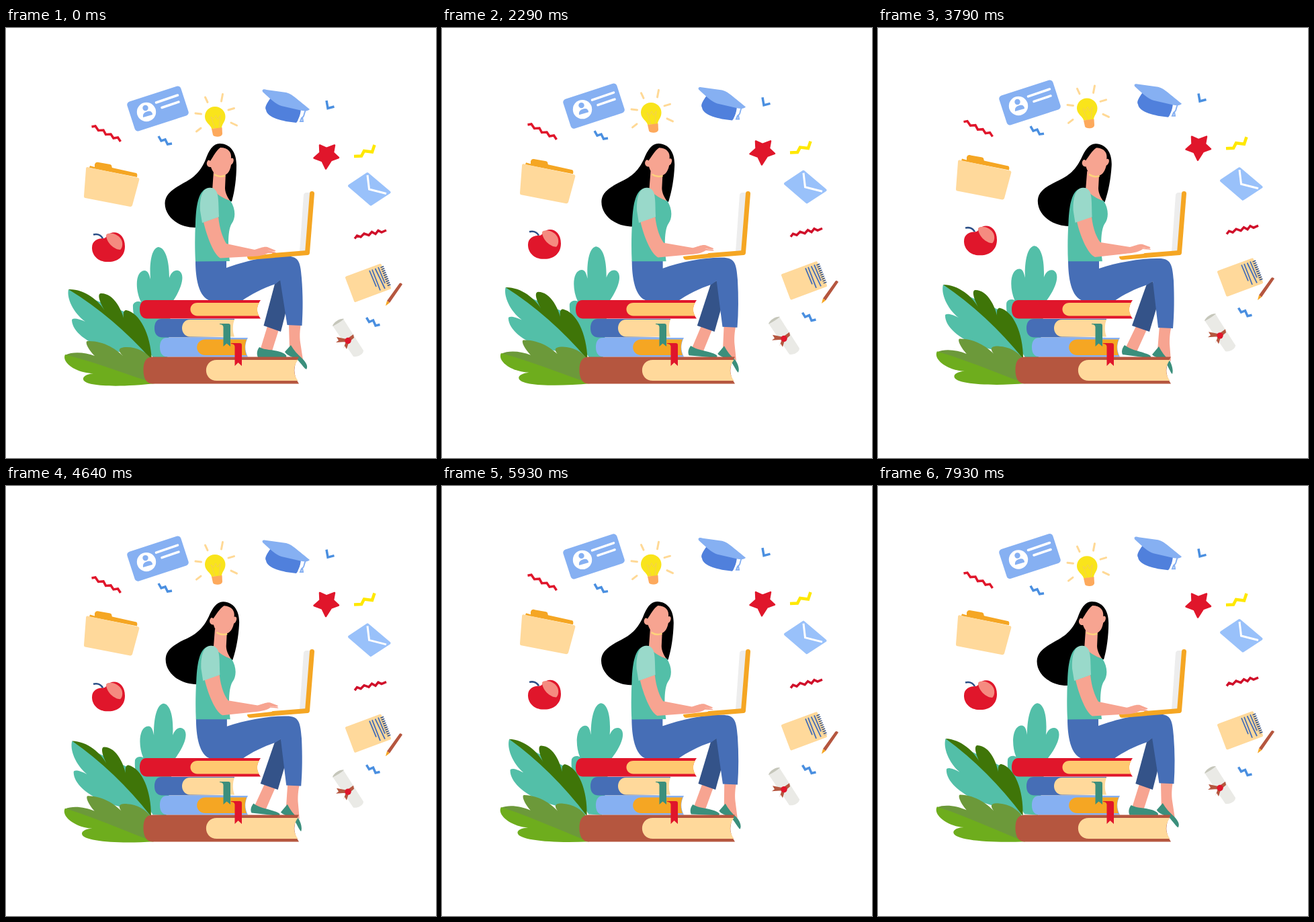
An HTML page for the animation above (8000 ms loop, 640 by 640 pixels).

```html
<!DOCTYPE html>
<html lang="en">
<head>
<meta charset="utf-8">
<title>Studying on a stack of books</title>
<style>
  html, body { margin: 0; width: 100%; height: 100%; overflow: hidden; background: #fff; }
  svg { display: block; width: 100%; height: 100%; }
  .line { fill: none; stroke-width: 3.5; }
  .teal { fill: #53bfa8; }
  .skin { fill: #f7a491; }
  .jeans { fill: #466eb6; }
  .shoe { fill: #3b8f7c; }
  .sky { fill: #86b0f2; }
  .cream { fill: #ffd99b; }
  .orange { fill: #f5a623; }
  .red { fill: #e0162b; }
  .brown { fill: #b5563f; }
  .blue { stroke: #4a8fe0; }
</style>
</head>
<body>
<svg viewBox="0 0 640 640">
  <!-- floating items: data-float = "rise height, time of the peak in ms" -->
  <g data-float="16 7000">
    <rect class="sky" x="-42" y="-23" width="84" height="46" rx="5" transform="translate(226 120) rotate(-18)"/>
    <circle cx="209" cy="125" r="14.2" fill="#fff"/>
    <circle class="sky" cx="207.5" cy="119" r="4.2"/>
    <path class="sky" d="M204 133C203 127 207 125 211 124C215 123 218 125 218 129Z"/>
    <path class="line" stroke="#fff" stroke-linecap="round" d="M223.500 111L255.500 100M232 118.500L257 110"/>
  </g>
  <g data-float="15.5 5300">
    <path fill="#f9e41b" d="M311 117C320 117 326.500 124 326.500 132C326.500 140 321 143 321 149L306 150C305 144 296 141 296 132C296 124 302 117 311 117Z"/>
    <path class="line" stroke="#f5d04f" style="stroke-width:1" d="M311 149L305 132L309 136L312 130L315 136L319 130L317 148"/>
    <path fill="#fda95c" d="M306 150L321.500 148L322 157C322 163 309 163 308 159Z"/>
    <path class="line" stroke="#ffd996" style="stroke-width:3" stroke-linecap="round" d="M282 127L290.500 128M296.500 103L300 110.500M322.500 98.500L320.500 109M331 122L339.500 119.500M335 141L343.500 145M283.500 154L290 149"/>
  </g>
  <g data-float="16 7500">
    <path fill="#5080dc" d="M394 104C389 111 384 118 387 122C389 134 412 139 432 141C436 137 438 129 439 121Z"/>
    <path class="line" stroke="#fff" d="M444 120L436 138"/>
    <path class="sky" d="M381.500 93C382 91 385 91 388 92L417 96C425 98 430 103 452 121C450 124 443 124 436 122L410 116C401 113 394 106 382 95Z"/>
    <path class="line" stroke="#86b0f2" style="stroke-width:2" d="M447 121C442 126 446 131 440 134L438 139L442 139L441 133"/>
  </g>
  <g data-float="16 6300">
    <path class="orange" d="M132 203C133 200 135 199 138 200L155 203C158 204 157 206 158 208L194 216Q196 217 195 222L124 208L125 205L132 207Z"/>
    <path class="cream" d="M121 207L197 223Q199 224 198 227L188 264Q187 266 185 266L118 253Q116 253 116 250L119 210Q119 207 121 207Z"/>
  </g>
  <g data-float="16 6600">
    <path class="red" d="M150 309C160 299 177 305 177 325C177 340 166 348 153 348C138 349 128 339 128 327C128 317 136 313 145 313C148 313 149 311 150 309Z"/>
    <path fill="#f58b80" d="M149 308C153 303 166 306 171 314C175 320 173 328 170 330C161 330 149 319 149 308Z"/>
    <path class="line" stroke="#2b4f87" style="stroke-width:2.500" d="M130 307.500C136 306 141 308 144 313"/>
  </g>
  <path data-float="16.5 5500" class="red" stroke="#e0162b" stroke-width="2.500" stroke-linejoin="round" d="M467 174.500L477 179L489 174.500L487 185.500L495 193L484 197L476 209.500L470.500 198L458.500 193.500L467.500 185.500Z"/>
  <g data-float="17 8000">
    <path fill="#99c1fa" stroke="#99c1fa" stroke-width="4" stroke-linejoin="round" d="M511 235L538 217L570.500 244.500L543 262.500Z"/>
    <path class="line" stroke="#fff" style="stroke-width:3" d="M538 219L540.500 240L566 246.500"/>
  </g>
  <g data-float="16 7300">
    <path class="cream" stroke="#ffd99b" stroke-width="4" stroke-linejoin="round" d="M507 371.500L557 353L571 387L520 406Z"/>
    <path class="line" stroke="#466eb6" style="stroke-width:1.800" d="M541 361L551 385M545 359.500L557 390.500M549.500 358L564 388M554 356L564 380"/>
    <path class="line" stroke="#2f4f88" style="stroke-width:5" stroke-dasharray="1.500 1.700" d="M559.500 355L571 385"/>
    <path class="brown" d="M585 381Q587 378 590 381.500L571 409L567 406Z"/>
    <path class="orange" d="M567 406L571 409L565 413.500Z"/>
  </g>
  <g data-float="16 7800">
    <path fill="#eaeae6" d="M486 443C488 437 498 432 502 433L532 480C532 486 523 490 517 489Z"/>
    <path fill="#c5c6ba" d="M486 444C488 437 498 432 503 433C499 437 493 440 486 444Z"/>
    <path class="brown" d="M507 463L517 456L518 461L510 468L507 478L504 473L502 477L506 467L491 468L495 465L492 460Z"/>
    <circle class="red" cx="509" cy="465.500" r="4.700"/>
  </g>
  <path data-float="17 8300" class="line" stroke="#e0162b" d="M127.500 147L133 146L137.500 152.500L145 152L148.500 158.500L156 158L160 164L166.500 163L170.500 169"/>
  <path data-float="16 4600" class="line blue" d="M227 161L231 168L237 166L240.500 173L247 172"/>
  <path data-float="16 6300" class="line blue" d="M477 108L479 119.500L488.500 117"/>
  <path data-float="16 5800" class="line" stroke="#ffe800" style="stroke-width:4.500" d="M518 191L529 190.500L533 183L545 184.500L548.500 174"/>
  <path data-float="16 8400" class="line" stroke="#d0102a" d="M519 313.500L522.500 309L528 311L533 306L540 308.500L544.500 303.500L550 306.500L554 301.500L559 304L566 301"/>
  <path data-float="16 4800" class="line blue" d="M536.500 431L540.500 437.500L546.500 435L550 443L556.500 441.500"/>

  <!-- plants: data-sway = "degrees, pivot x, pivot y, time of the peak" -->
  <path data-sway="4.4 270 465 7200" class="teal" d="M227 326C237 327 243 345 243 372C246 363 251 360 256 361C267 364 264 385 246 410L240 492H220C198 462 188 430 189 412C191 407 197 406 201 408C192 390 192 362 206 361C211 361 213 366 215 374C213 345 218 327 227 326Z"/>
  <g data-sway="4.800 255 475 7300">
    <path class="teal" d="M93 389C90 402 100 424 118 437C107 432 98 431 98 435C99 452 120 468 150 478L217 493L178 423Z"/>
    <path fill="#3f7508" d="M93 389C115 388 138 404 149 424C140 410 135 396 141 395C160 394 174 420 178 443C174 430 173 420 179 420C199 424 215 455 217 494Q160 430 93 389Z"/>
  </g>
  <g data-sway="3.900 218 480 7300">
    <path fill="#6c993a" d="M88 487C100 481 118 483 132 488C122 478 117 467 121 466C145 465 165 478 177 491C166 481 165 475 180 475C195 475 208 482 216 492L222 529C190 525 130 510 88 487Z"/>
    <path fill="#6ead1d" d="M88 486C82 498 105 514 130 514C120 515 114 519 115 523C117 534 170 535 222 529C180 516 135 498 88 486Z"/>
  </g>

  <!-- woman -->
  <g class="body"><g class="head">
    <path d="M318 172C333 172 343 184 343 204C343 225 340 245 336 258L315 262L300 297H281C257 297 236.500 281 236.500 261C236.500 248 248 240 262 232C282 222 290 212 297 196C302 182 308 172 318 172Z"/>
  </g></g>
  <path id="backShin" class="skin"/>
  <path id="backShoe" class="shoe"/>
  <path id="backLeg" fill="#345389"/>
  <path id="frontShin" class="skin"/>
  <path id="frontShoe" class="shoe"/>
  <path id="trousers" class="jeans"/>
  <g class="body">
    <path class="skin" d="M309 213L307 242C313 250 325 254 334 258C328 250 326 243 326 238L327 215Z"/>
    <g class="head">
      <path class="skin" d="M319 178C331 178 336 185 335 194C338 192 340 196 338 200C337 203 335 203 335 204C333 215 328 220 320 220C311 220 307 213 305 207C300 208 297 202 300 198C301 196 303 197 304 198C308 192 313 182 319 178Z"/>
      <path class="line" stroke="#ffd27c" style="stroke-width:2.500" d="M310 218Q318 223 326 219.500"/>
    </g>
    <path class="teal" d="M302 238C288 240 283 258 282 290C281 310 281 330 282 347.500L333 347C330 325 330 300 336 291C342 283 342 269 334 257C325 255 313 247 307 240Z"/>
  </g>
  <path fill="#ededed" d="M443 248Q444 245 447 245H453L446 332L437 333Z"/>
  <path class="line" stroke="#f5a623" style="stroke-width:7" stroke-linecap="round" stroke-linejoin="round" d="M455.500 246.500L448.500 334.500L398 338.500"/>
  <path class="orange" d="M359 340L400 335.500V342L364 345Q359 345 359 340Z"/>
  <path id="arm" class="skin"/>
  <g class="body">
    <path fill="#99d9ca" d="M301 238C291 240 288 256 289 272L292 290L317 281C316 265 317 250 313 243C310 238 306 237 301 238Z"/>
  </g>

  <!-- books -->
  <path class="red" d="M209 405H379C372 414 372 424 379 432.500H209C202 432 199 426 199 419C199 411 202 405 209 405Z"/>
  <path fill="#ffc870" d="M285 409H377C373 415 373 423 377 428.500H285C271 428 271 409 285 409Z"/>
  <path class="jeans" d="M232 433H340V434.500L275 436V459L340 460.500H232C224 460 221 454 221 447C221 439 224 433 232 433Z"/>
  <path class="cream" d="M274 434H340C337 442 337 452 340 459.500H274C258 459 258 434 274 434Z"/>
  <path class="sky" d="M240 461H360C355 470 355 480 360 489.500H240C232 489 229 483 229 475C229 467 232 461 240 461Z"/>
  <path class="orange" d="M297 463.500H358C355 472 355 480 358 487H297C280 487 280 463.500 297 463.500Z"/>
  <path class="brown" d="M218 489.500H436C427 503 427 516 436 529.500H218C208 529 204.500 520 204.500 509C204.500 497 208 490 218 489.500Z"/>
  <path class="cream" d="M314 494H434.500C427 504 427 515 434.500 525H314C292.500 525 292.500 494 314 494Z"/>
  <path class="shoe" d="M318 440H331Q334 440 334 443V474L328.500 469.500L323.500 474V445Q323 441 318 441Z"/>
  <path class="red" d="M335 469H348Q351 469 351 472V503L345.500 498L340.500 503V474Q340 470 335 470Z"/>
</svg>
<script>
  const LOOP = 8000, CYCLE = 15000, LEAN_PERIOD = 7500;

  // Each limb is a pair of poses, upright and leaning, with matching commands.
  const poses = {
    backShin: [
      "M389 444L406 449L395 484L378 480Z",
      "M384 444L400 449L385 482L368 477Z"],
    backShoe: [
      "M377 475C373 480 373 486 375 490L417 490C419 487 414 484 408 482C396 478 386 480 377 475Z",
      "M367 472C363 477 362 482 364 486L402 491C411 490 404 486 397 484C386 480 376 479 367 472Z"],
    backLeg: [
      "M409 374L400 381L383.500 443L409 452L421 405Z",
      "M409 377L400 381L378 443L404 452L418 405Z"],
    frontShin: [
      "M421 440H439C437 452 437 460 438 468L442 494L422 478Z",
      "M419 443H437C434 455 434 463 434 470L436 496L416 480Z"],
    frontShoe: [
      "M424 472L415 482C418 488 428 490 433 493C440 500 444 507 447 508C450 504 447 498 441 492C434 486 428 479 424 472Z",
      "M418 474L408 486C411 490 422 492 427 496C432 503 435 513 438 515C440 509 437 500 434 495C427 489 422 482 418 474Z"],
    trousers: [
      "M282 347H328V357C355 347 390 339 413 339.500C435 339 438 345 440 372C442 397 442 420 440.500 443L418.500 442L408 375L401 381C382 387 364 397 351 406H305C286 402 282 370 282 347Z",
      "M283 346H329V358C355 349 390 343 415 343C436 342 438 351 440 376C441 400 441 425 439 447L417 446L409 377L401 382C383 388 365 397 352 406H306C287 402 283 370 283 346Z"],
    arm: [
      "M294 289L316 281C318 300 323 313 328 321L370 330C378 328 383 325 389 326L401 331C403 333 396 333 389 330C395 333 402 333 402 335L390 335C383 339 373 340 365 340L319 342.500C309 337 299 310 294 289Z",
      "M296 288L318 281C320 300 326 313 331 319L375 326C384 324 388 321 394 322L405 326C407 329 400 328 392 327C398 329 406 327 406 330L394 329C388 334 377 335 368 336L323 341C312 336 301 310 296 288Z"]
  };

  const number = /\d+(\.\d+)?/g;
  const mixPath = ([from, to], k) => {
    const ends = to.match(number);
    let i = 0;
    return from.replace(number, n => (+n + (ends[i++] - n) * k).toFixed(2));
  };
  const ease = x => (1 - Math.cos(Math.PI * x)) / 2;
  // Rises until the peak, then settles over the rest of the long cycle.
  const swing = (t, peak) => t < peak ? ease(t / peak) : 1 - ease((t - peak) / (CYCLE - peak));

  const collect = key => [...document.querySelectorAll(`[data-${key}]`)]
    .map(el => [el, ...el.dataset[key].split(" ").map(Number)]);
  const floats = collect("float"), sways = collect("sway");
  const bodies = document.querySelectorAll(".body"), heads = document.querySelectorAll(".head");
  const limbs = Object.entries(poses).map(([id, pair]) => [document.getElementById(id), pair]);
  const turn = (el, angle, x, y) => el.setAttribute("transform", `rotate(${angle} ${x} ${y})`);

  function draw(t) {
    for (const [el, rise, peak] of floats)
      el.setAttribute("transform", `translate(0 ${-rise * swing(t, peak)})`);
    for (const [el, angle, x, y, peak] of sways) turn(el, angle * swing(t, peak), x, y);
    const lean = ease(t / LEAN_PERIOD * 2);
    bodies.forEach(el => turn(el, 0.6 * lean, 305, 430));
    heads.forEach(el => turn(el, 2.9 * lean, 320, 250));
    for (const [el, pair] of limbs) el.setAttribute("d", mixPath(pair, lean));
  }

  const start = performance.now();
  function tick() {
    draw((performance.now() - start) % LOOP);
    requestAnimationFrame(tick);
  }
  tick();
</script>
</body>
</html>
```
